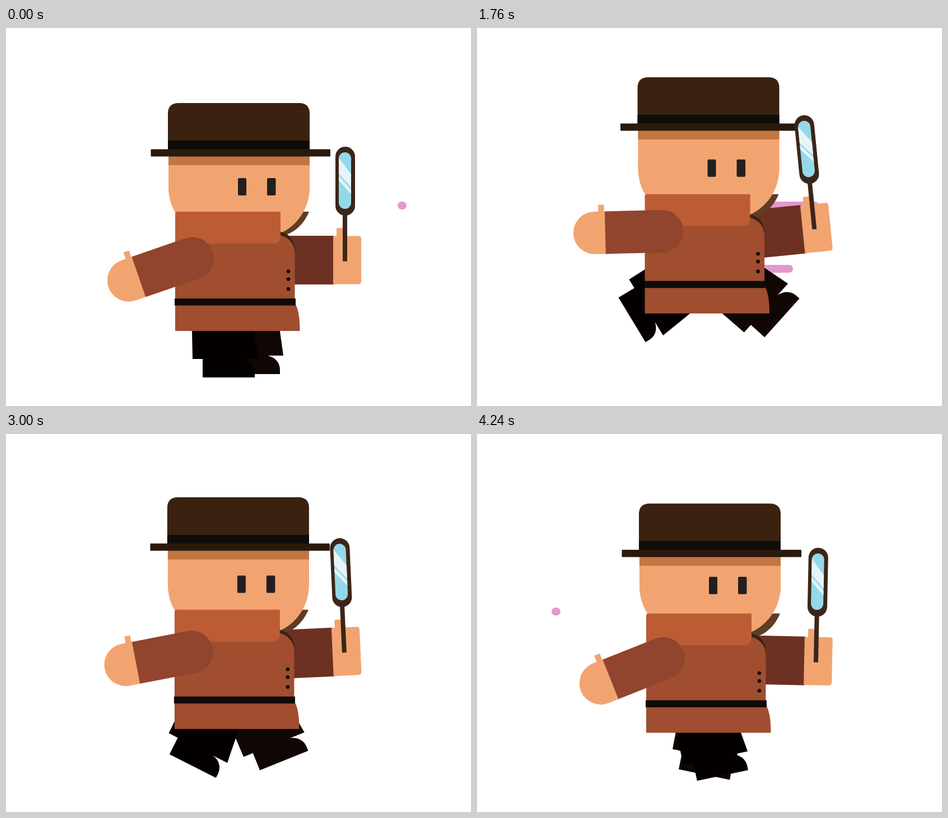
Recreate the animation shown at these times as an HTML page. Size 830 px wide and 675 px high, loop 4280 ms.

```html
<!DOCTYPE html>
<html lang="en">
<head>
<meta charset="utf-8">
<title>Walking detective</title>
<style>
  html, body { margin: 0; width: 100%; height: 100%; overflow: hidden; background: #fff; }
  svg { display: block; width: 100vw; height: 100vh; }
  .streak { stroke: #e298cd; stroke-width: 14; stroke-linecap: round; }
</style>
</head>
<body>
<svg viewBox="0 0 830 675">
  <defs>
    <g id="leg">
      <path d="M331 490H436L450 591H333Z"/>
      <path d="M351 585H422V591C436 594 444 604 444 616V624H351Z"/>
    </g>
    <clipPath id="lens"><rect x="594" y="222" width="22" height="101" rx="11"/></clipPath>
  </defs>

  <g id="back"></g>

  <g class="farArm"><path d="M498 371H586V458H498Z" fill="#6c3122"/></g>

  <path class="body" d="M470 328H541C532 350 515 367 490 372H470Z" fill="#5e3d22"/>

  <rect id="face" x="290" y="180" width="252" height="195" rx="90" fill="#f2a470"/>
  <g id="hat">
    <path d="M290 228H542V290H290Z" fill="#f2a470"/>
    <path d="M290 228H542V245H290Z" fill="#c37542"/>
    <path d="M289 218V153Q289 134 308 134H523Q542 134 542 153V218Z" fill="#3b2210"/>
    <path d="M289 201H542V217H289Z" fill="#0f0d08"/>
    <rect x="258.500" y="216.500" width="320.500" height="13" rx="1" fill="#2a1a0d"/>
  </g>
  <g id="eyes" fill="#231f20">
    <rect x="414" y="268" width="15" height="31" rx="2"/>
    <rect x="466" y="268" width="15.500" height="31" rx="2"/>
  </g>

  <g class="farArm">
    <rect x="590" y="357" width="12" height="30" rx="2" fill="#f2a470"/>
    <path d="M584 371.500H629Q634 371.500 634 376V452Q634 457 629 457.500H584Z" fill="#f2a470"/>
    <path d="M601 330H609V416.500H601Z" fill="#3c2518"/>
    <rect x="588" y="212" width="35" height="123" rx="17.500" fill="#3c2518"/>
    <g clip-path="url(#lens)">
      <path d="M590 220H620V325H590Z" fill="#95d8ea"/>
      <path d="M592 229L618 264V287L592 258ZM592 262L618 291V299L592 270Z" fill="#e6f4f8"/>
    </g>
  </g>

  <g id="farLeg" fill="#100705"><use href="#leg" x="45" y="-6"/></g>
  <g id="nearLeg" fill="#040000"><use href="#leg"/></g>

  <g class="body">
    <path d="M480 364H490C506 367 516 380 516 400H480Z" fill="#3b2415"/>
    <path d="M302 370H490C505 374 515.500 386 515.500 402V483L517 494C522 503 524.500 518 524.500 541H302Z" fill="#a04e2f"/>
    <path d="M301 483H517V495.500H301Z" fill="#0f0b07"/>
    <g fill="#0f0b07">
      <circle cx="504" cy="434.500" r="3.300"/>
      <circle cx="504" cy="448.500" r="3.300"/>
      <circle cx="504" cy="466" r="3.300"/>
    </g>
    <path d="M302 332Q302 328 306 328H490V371Q490 385 476 385H302Z" fill="#bc5c35"/>
  </g>

  <g id="nearArm">
    <rect x="-112.500" y="-50" width="10.500" height="20" fill="#f2a470"/>
    <path d="M-100 -38H-120A38 38 0 0 0 -120 38H-100Z" fill="#f2a470"/>
    <path d="M-101 -38H0A38.500 38 0 0 1 0 38H-101Z" fill="#91442e"/>
  </g>

  <g id="front"></g>
</svg>
<script>
const LOOP = 4280, FRAME = 40, QUARTER = 360, RUN = 520, LAG = 0.15;
const $ = id => document.getElementById(id);

// Wind streaks by lane: y, start x, end x
const high = [317, 707, 141], low = [505, 682, 95], mid = [430, 620, 77];
const streaks = [
  [high, 0], [high, 224], [high, 1600], [high, 3720], [high, 3374, 'front'],
  [low, 700], [low, 1100],
  [mid, -10], [mid, 1630], [mid, 2270], [mid, 3420]
].map(([lane, start, layer = 'back']) => {
  const line = document.createElementNS('http://www.w3.org/2000/svg', 'line');
  line.setAttribute('class', 'streak');
  $(layer).append(line);
  return { lane, start, line };
});

function drawStreak({ lane: [y, from, to], start, line }, t) {
  const k = (t - start) / RUN;
  line.style.display = k >= -0.04 && k <= 1.16 ? '' : 'none';
  const at = s => from + (to - from) * Math.min(1, Math.max(0, s / (1 - LAG)));
  line.setAttribute('x1', at(k) - 1);
  line.setAttribute('x2', at(k - LAG) + 1);
  line.setAttribute('y1', y);
  line.setAttribute('y2', y);
}

// Swing from -1 (near leg forward) to 1 (near leg back); each quarter has its own passing speed
const speeds = [1.27, 2, 1.55, 0.65];
function swing(t) {
  const n = t / QUARTER, k = Math.floor(n) % 4;
  const s = k % 2 ? n % 1 : 1 - n % 1;
  const size = 1 - s * s * (3 - 2 * s + speeds[k] * (s - 1));
  return k < 2 ? size : -size;
}

function draw(t) {
  const p = swing(t), back = p > 0;
  const mix = (whenBack, whenForward) => Math.abs(p) * (back ? whenBack : whenForward);
  const set = (el, value) => el.setAttribute('transform', value);
  const each = (name, value) => document.querySelectorAll('.' + name).forEach(el => set(el, value));

  const dx = mix(-2.5, 0), bodyY = mix(-32, -34.8), armY = mix(-49.5, -50);
  const shift = y => `translate(${dx} ${y})`;
  const leg = (angle, pivot) => `translate(0 ${bodyY}) rotate(${angle} ${pivot})`;

  each('body', shift(bodyY));
  set($('hat'), shift(mix(-47, -46)));
  set($('face'), shift(mix(-34, -61)));
  set($('eyes'), shift(mix(-34, -61)));
  each('farArm', `${shift(armY)} rotate(${mix(-5.8, 5.5)} 518 415)`);
  set($('nearArm'), `translate(${332.3 + dx} ${411.5 + armY}) rotate(${-19 + mix(18, -12.5)})`);
  set($('nearLeg'), leg(mix(60, -55), back ? '400.5 481' : '384.7 422'));
  set($('farLeg'), leg(mix(-49, 55), back ? '416 469' : '436 437'));
  streaks.forEach(s => drawStreak(s, t));
}

const begin = performance.now();
function tick() {
  const t = (performance.now() - begin) % LOOP;
  draw(Math.floor(t / FRAME) * FRAME);
  requestAnimationFrame(tick);
}
tick();
</script>
</body>
</html>
```
